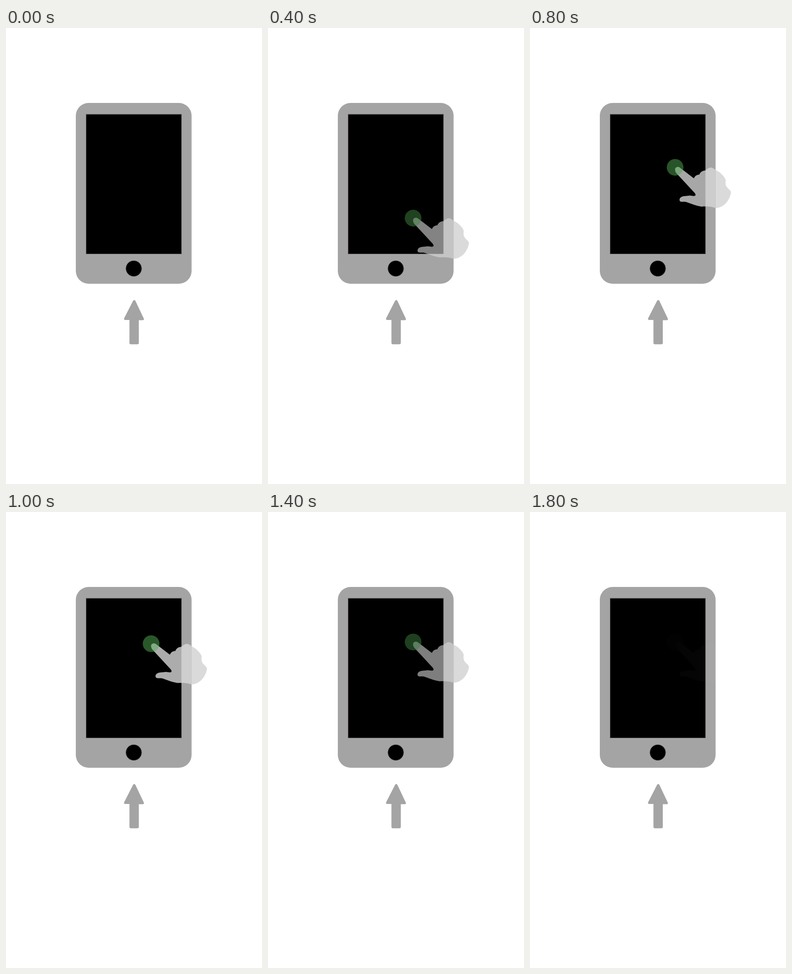
Write an HTML page that moves like this. It is 561 px wide and 998 px high and loops after 2000 ms.

```html
<!DOCTYPE html>
<html lang="en">
<head>
<meta charset="utf-8">
<title>Swipe up</title>
<style>
  html, body { margin: 0; width: 100%; height: 100%; overflow: hidden; background: #fff; }
  svg { display: block; width: 561px; height: 998px; }
  .gray { fill: #a4a4a4; }
  .hand { fill: #dadada; }
  .dot { fill: #6adc6c; }
  .half { opacity: .5; }
</style>
</head>
<body>
<svg viewBox="0 0 561 998">
  <defs>
    <path id="hand" d="M318 422 C317 416 324 413 329 417 L359 440 C362 434 366 432 371 432
      C374 425 379 423 384 423 C389 418 393 416.5 397 416.5 C402 417 404 420 407 422
      C416 426 426 435 429 444 C428 450 428 456 433 461 C437 465 440 467 440.5 471
      C438 485 430 496 421 501 Q414 505 407 505 C398 502 388 501 376 502
      C363 500 352 495 341 491.5 C336 491 333 492 330 491 C327 489 327 486 329 483
      C333 478 342 479 348 478 C354 477 358 480 362 478 C364 476 362 473 359 470
      L321 429 Q318 426 318 422Z"/>
    <circle id="dot" cx="318" cy="416" r="18.3"/>
    <rect id="body" x="153" y="164" width="253.7" height="395.7" rx="28"/>
    <path id="arrow" d="M278.5 597 Q281 593.5 283.5 597 L302 636 Q303 639.5 299.5 639.5 H291
      V689 Q291 692.3 287.5 692.3 H274 Q270.5 692.3 270.5 689 V639 H261.5 Q257.5 639 259 635Z"/>
    <clipPath id="solid"><use href="#body"/><use href="#arrow"/></clipPath>
  </defs>

  <!-- opaque hand over the empty background -->
  <g id="under">
    <use href="#dot" class="dot"/>
    <use href="#hand" class="hand"/>
    <use href="#dot" class="dot half"/>
  </g>

  <use href="#body" class="gray"/>
  <rect x="175.6" y="188.9" width="209" height="305.6" stroke="#685f5f" stroke-width="1"/>
  <circle cx="280" cy="526.4" r="17.2" stroke="#5c5454" stroke-width="1"/>
  <use href="#arrow" class="gray"/>

  <!-- translucent hand over the device -->
  <g clip-path="url(#solid)">
    <g id="over">
      <use href="#hand" class="hand"/>
      <use href="#dot" class="dot half"/>
    </g>
  </g>
</svg>
<script>
  const under = document.getElementById('under');
  const over = document.getElementById('over');
  const LOOP = 2000, STEP = 100, REST = 284.5, TRAVEL = 536, PEAK = 0.8;

  // remaining distance to the resting place, easing out
  function distance(k) {
    const root = 0.588 * (12.65 - k) + 0.035 * Math.max(0, 4 - k) ** 2;
    return k < 12 ? root ** 3 : 0;
  }

  function alpha(k) {
    if (k < 1) return 0;
    if (k < 12) return PEAK * (1 - distance(k) / TRAVEL);
    return Math.max(0, Math.min(PEAK, 0.58 - 0.14 * (k - 14)));
  }

  function draw(now) {
    const k = Math.min(18, Math.floor((now % LOOP) / STEP));
    const move = `translate(0 ${(REST + distance(k) - 416).toFixed(2)})`;
    const a = alpha(k);
    under.setAttribute('transform', move);
    over.setAttribute('transform', move);
    under.setAttribute('opacity', a > 0.1 ? 1 : 0);
    over.setAttribute('opacity', a.toFixed(3));
  }

  const start = performance.now();
  function tick() {
    draw(performance.now() - start);
    requestAnimationFrame(tick);
  }
  tick();
</script>
</body>
</html>
```
